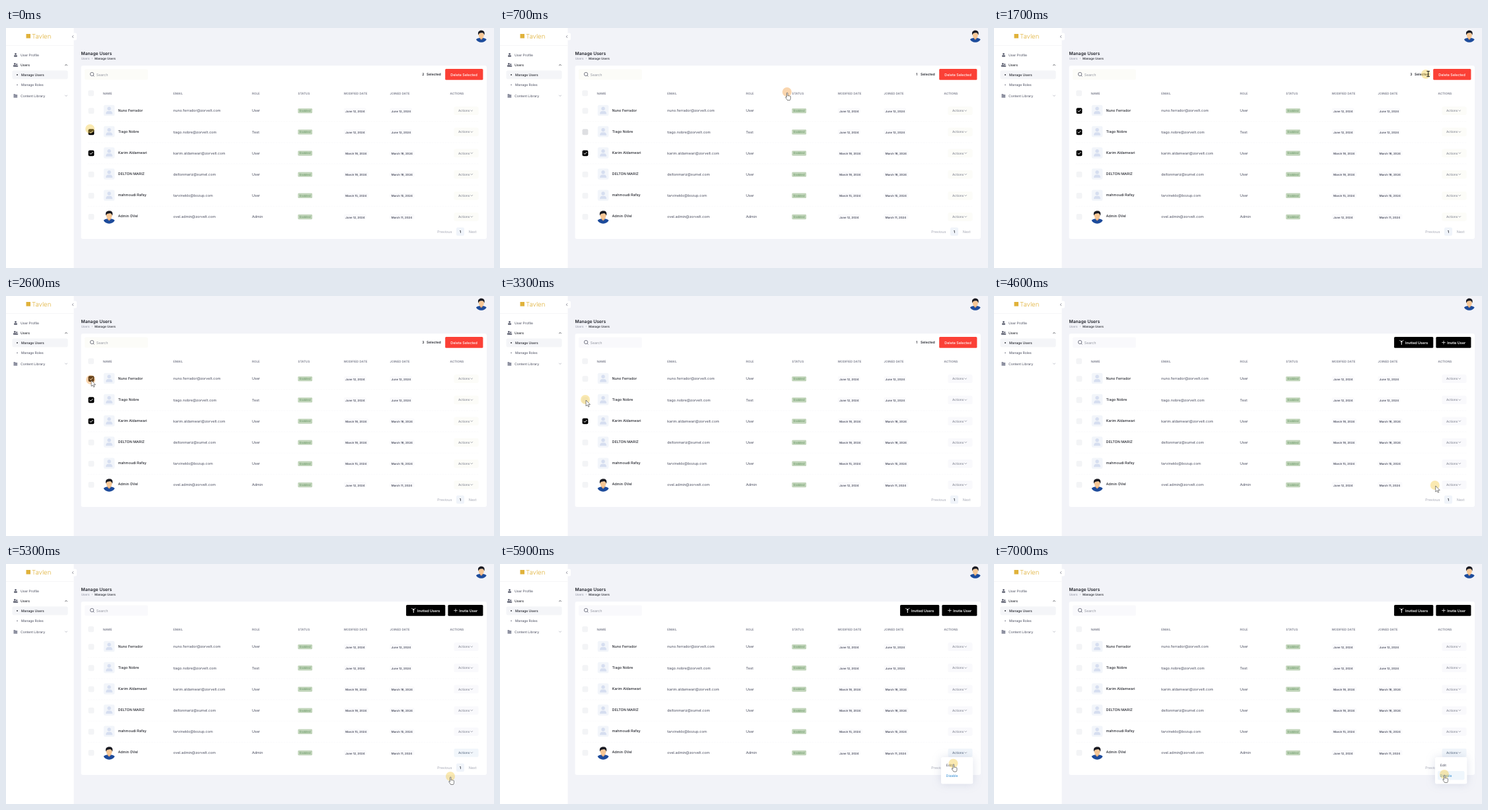
An HTML page for the animation above (7500 ms loop, 738x364 px).

```html
<!DOCTYPE html>
<html lang="en">
<head>
<meta charset="utf-8">
<title>Manage Users</title>
<style>
html, body { margin: 0; width: 100%; height: 100%; overflow: hidden; background: #f2f3f8; }
svg { display: block; width: 738px; height: 364px; font-family: Inter, sans-serif; }
text { white-space: pre; text-rendering: geometricPrecision; }
.line { fill: none; stroke-linecap: round; stroke-linejoin: round; }
</style>
</head>
<body>
<svg id="stage" viewBox="0 0 738 364"></svg>
<script>
const LOOP = 7500, STEP = 100;
const stage = document.getElementById('stage');

const rect = (x, y, w, h, fill, r = 0, more = '') =>
  `<rect x="${x}" y="${y}" width="${w}" height="${h}" rx="${r}" fill="${fill}" ${more}/>`;
const circle = (x, y, r, fill, more = '') => `<circle cx="${x}" cy="${y}" r="${r}" fill="${fill}" ${more}/>`;
const line = (d, color, width = 0.7, more = '') =>
  `<path class="line" d="${d}" stroke="${color}" stroke-width="${width}" ${more}/>`;
const shape = (d, fill, more = '') => `<path d="${d}" fill="${fill}" ${more}/>`;
const text = (x, y, str, size, fill, weight = 400, more = '') =>
  `<text x="${x}" y="${y}" font-size="${size}" fill="${fill}" font-weight="${weight}" ${more}>${str}</text>`;
const group = (id, body, more = '') => `<g id="${id}" ${more}>${body}</g>`;
const chevron = (x, y, color, up = 1) => line(`M${x - 1.5} ${y + up * .8}l1.5 ${-1.5 * up} 1.5 ${1.5 * up}`, color);

const DARK = '#22242c', GRAY = '#606373', PALE = '#a3a6b3';
const rowY = i => 125.5 + 32.17 * i;

const users = [
  ['Nuno Ferrador', 'nuno.ferrador@zorvelt.com', 'User', 'June 12, 2024', 'June 12, 2024'],
  ['Tiago Nobre', 'tiago.nobre@zorvelt.com', 'Test', 'June 12, 2024', 'June 12, 2024'],
  ['Karim Aldamwari', 'karim.aldamwari@zorvelt.com', 'User', 'March 18, 2024', 'March 18, 2024'],
  ['DELTON MARIZ', 'deltonmariz@xumel.com', 'User', 'March 18, 2024', 'March 18, 2024'],
  ['mahmoudi Rafsy', 'tarvineklo@bozup.com', 'User', 'March 15, 2024', 'March 15, 2024'],
  ['Admin OVel', 'ovel.admin@zorvelt.com', 'Admin', 'June 12, 2024', 'March 11, 2024']
];

function portrait(x, y, scale) {
  return `<g transform="translate(${x} ${y}) scale(${scale})">` +
    shape('M-8.5 5.5Q-6.5 3.4-2.5 3H2.5Q6.5 3.4 8.5 5.5Q6 10.3 0 10.3Q-6 10.3-8.5 5.5Z', '#1d4b9b') +
    shape('M-2.2 1H2.2V4L0 6.2-2.2 4Z', '#e3a978') +
    shape('M-4.2-5H4.2V-.5Q3.4 3.8 0 3.8Q-3.4 3.8-4.2-.5Z', '#f7c795') +
    shape('M-4.9-1.5Q-6-6.5-3.8-7.8Q-1-10 2.5-8.8Q6.2-7.5 4.9-1.5L3.9-3.8Q2.8-5.8 0-5.2Q-3-4.8-3.9-3.8Z', '#191a22') + '</g>';
}

function placeholder(x, y) {
  return rect(x - 8.3, y - 8.3, 16.6, 16.6, '#f2f5fa', 2.5) + circle(x, y - 2.7, 2.7, '#d6def0') +
    shape(`M${x - 5} ${y + 5.5}Q${x - 5} ${y + 1} ${x - 1.5} ${y + 1}h3Q${x + 5} ${y + 1} ${x + 5} ${y + 5.5}Z`, '#d6def0');
}

function sidebar() {
  const person = (x, y, s = 1) => circle(x, y - 1.6 * s, 1.4 * s, GRAY) + rect(x - 2.5 * s, y + .3 * s, 5 * s, 2.4 * s, GRAY, 1);
  return rect(0, 0, 102.5, 364, '#fff') + rect(0, 26, 102.5, .6, '#f0f0f3') +
    rect(30.5, 9, 6.5, 6.5, '#e0b23a') + text(39, 16.2, 'Tavlen', 9.6, '#e0b23a', 300) +
    rect(96, 7.5, 11, 11, '#fff', 2) + line('M101.8 11.5l-1.6 1.6 1.6 1.6', GRAY) +
    person(14.5, 41) + text(22, 42.8, 'User Profile', 5, GRAY, 500) +
    person(13.3, 56) + person(16.3, 56.5, .8) + text(22, 58, 'Users', 5, DARK, 500) + chevron(91, 56, DARK) +
    rect(9.5, 64.5, 84, 13, '#f4f5f8', 2) +
    circle(17, 71, .9, DARK) + text(23, 72.8, 'Manage Users', 5, DARK, 500) +
    circle(17, 86.3, .8, GRAY) + text(23, 88.1, 'Manage Roles', 5, GRAY, 500) +
    shape('M11.5 100h2.3l.8 1h2.6v4.8h-5.7z', '#8d90a0') +
    text(22, 104.6, 'Content Library', 5, GRAY, 500) + chevron(91, 102.8, PALE, -1);
}

function header() {
  return portrait(718.8, 12.2, .93) + text(113.5, 41, 'Manage Users', 6.7, DARK, 600) +
    text(113.7, 47.5, 'Users', 4.6, '#8a8d9c') + circle(130.3, 46, .6, PALE) +
    text(134, 47.5, 'Manage Users', 4.6, DARK, 500) +
    rect(113.5, 57, 613.5, 263, '#fff', 3);
}

function table() {
  const heads = { NAME: 146.5, EMAIL: 253, ROLE: 372, STATUS: 441.5, 'MODIFIED DATE': 511, 'JOINED DATE': 580.5, ACTIONS: 671.5 };
  let out = rect(119, 62.5, 95.5, 16, '#fafafc', 2, 'class="soft"') + circle(130, 70, 2.7, 'none', `stroke="${GRAY}" stroke-width=".8"`) +
    line('M132 72l1.2 1.3', GRAY) + text(136.5, 72.7, 'Search', 5.4, '#92959f') +
    rect(124.3, 94.6, 8.6, 8.6, '#f3f4f6', 2);
  for (const name in heads) out += text(heads[name], 100.8, name, 4.6, '#7c7f8e', 600);
  users.forEach(([name, email, role, modified, joined], i) => {
    const y = rowY(i), last = i === 5;
    if (i) out += line(`M124 ${y - 16}H715`, '#f7f7f9', .6, 'stroke-dasharray="2 2"');
    out += rect(124.5, y - 4.3, 8.8, 8.8, '#f3f4f6', 2, `id="box${i}"`) +
      line(`M126.9 ${y + .2}l1.5 1.5 2.7-3.2`, '#fff', 1, `id="tick${i}"`) +
      (last ? portrait(156, y, 1) : placeholder(156, y - .5)) +
      text(169.5, y + 1.1, name, 5.4, DARK, 500) + text(253, y + 1.9, email, 5.4, GRAY, 500) +
      text(372, y + 1.9, role, 5.4, GRAY, 500) +
      rect(441.5, y - 3.6, 21.7, 7.4, '#c0d4b9', 1.3) + text(444, y + 1.5, 'Enabled', 4.3, '#6b9a68', 500) +
      [[511, modified], [580.5, joined]].map(([x, date]) =>
        rect(x, y - 4, date[0] === 'M' ? 37 : 33.5, 8, '#fafafc', 1.5) + text(x + 2.3, y + 2.3, date, 4.3, '#4d5060', 600)).join('') +
      rect(677.5, y - 6.3, 37, 12.8, '#f9f9fb', 2, `class="soft" id="action${i}"`) +
      text(684, y + 1.7, 'Actions', 4.8, '#858895', 500, `id="label${i}"`) + chevron(704.2, y, '#858895', -1);
  });
  return out + text(652.3, 310.5, 'Previous', 5.4, PALE) + rect(681, 302.5, 12, 12.5, '#f0f4fa', 2) +
    text(687, 310.5, '1', 5.4, DARK, 600, 'text-anchor="middle"') + text(699.7, 310.5, 'Next', 5.4, PALE);
}

function toolbar() {
  const button = (x, w, fill) => rect(x, 61.9, w, 16.8, fill, 1.5);
  const selected = text(629.3, 72.4, '', 5.1, DARK, 600, 'id="count"') + text(636, 72.4, 'Selected', 5.1, DARK, 600) +
    button(664.2, 57.2, '#fb4036') + text(672.3, 72.5, 'Delete Selected', 5.4, '#fff', 500);
  const invite = button(605.1, 59.2, '#000') + button(668.4, 53, '#000') +
    circle(616.3, 69.3, 1.3, '#fff') + line('M614.3 67.8l-.6-.6M618.3 67.8l.6-.6M616.3 71v2.6', '#fff', 1) +
    text(622, 72.5, 'Invited Users', 5.4, '#fff', 600) +
    line('M680 68.2v4.6M677.7 70.5h4.6', '#fff') + text(685.2, 72.5, 'Invite User', 5.4, '#fff', 600);
  return group('selected', selected) + group('invite', invite);
}

function menu() {
  return group('menu', rect(667, 293, 48.3, 40.5, '#fff', 2.5, 'style="filter:drop-shadow(0 0 7px #596a9930)"') +
    text(674.8, 307, 'Edit', 5, GRAY, 500) + rect(671, 314, 40.5, 13.5, '#eff6fc', 2, 'id="hover"') +
    text(674.8, 322.7, 'Disable', 5, '#3b91d4', 500));
}

function pointer() {
  const edge = 'stroke="#333" stroke-width=".6" stroke-linejoin="round"';
  return group('pointer', circle(0, 0, 7, '#f4cb45', 'id="glow" opacity=".42"') +
    group('arrow', shape('M1 1V10L3.1 8.1 4.6 11.2 6 10.5 4.6 7.6H7.4Z', '#fff', edge)) +
    group('hand', shape('M0 1.2Q0 .2.8.2Q1.7.2 1.7 1.2V5Q2.6 4.3 3.3 5Q4.2 4.5 4.8 5.3Q6 5 6 6.3V8.6Q6 10 5 11.5H1Q.3 10-1.7 7.5Q-1.9 6.2-.8 6.5L0 7.2Z', '#fff', edge + ' transform="translate(-.5 1)"')) +
    group('beam', line('M1.7-4.4h4M3.7-4.4v8M1.7 3.6h4', '#222', 1)));
}

stage.innerHTML = sidebar() + header() + table() + toolbar() + menu() + pointer();
const el = id => document.getElementById(id);
const show = (id, on) => el(id).setAttribute('display', on ? 'inline' : 'none');
const paint = (id, color) => el(id).setAttribute('fill', color);

// Pointer stops: time, x, y, cursor used from then on.
const stops = [
  [0, 127, 153, 'none'], [100, 128, 154, 'arrow'], [700, 434, 97, 'hand'], [900, 456, 94, 'arrow'],
  [1300, 695, 71, 'hand'], [1700, 653, 70, 'beam'], [1800, 668, 71, 'arrow'], [2300, 104, 194, 'arrow'],
  [2600, 128, 127, 'arrow'], [3000, 129, 157, 'arrow'], [3300, 129, 157, 'arrow'], [4100, 573, 287, 'arrow'],
  [4800, 690, 287, 'hand'], [5300, 672, 322, 'hand'], [5700, 690, 287, 'hand'], [6100, 681, 318, 'hand'],
  [6600, 681, 319, 'hand'], [LOOP, 681, 319, 'hand']
];
// Spans of time in which each checkbox is ticked.
const ticked = [[[900, 2700]], [[0, 100], [800, 3300]], [[0, 4200]], [], [], []];
const clicks = [700, 2600, 3200, 5700];
const within = (t, spans) => spans.some(([from, to]) => t >= from && t < to);

function draw(t) {
  const checks = ticked.map(spans => within(t, spans));
  const count = checks.filter(Boolean).length;
  checks.forEach((on, i) => {
    const focused = i === 1 && t < 800;
    paint('box' + i, on ? '#000' : focused ? '#dedfe2' : '#f3f4f6');
    show('tick' + i, on);
  });
  el('count').textContent = count;
  show('selected', count > 0);
  show('invite', count === 0);

  document.querySelectorAll('.soft').forEach(node => node.setAttribute('fill', t < 2700 ? '#fcfcf8' : '#f9f9fc'));
  if (t >= 4800) paint('action5', '#f1f6fb');
  paint('label5', t >= 4800 ? '#5f6f86' : '#858895');
  show('menu', t >= 5700);
  show('hover', t >= 6000);

  const next = stops.findIndex(stop => stop[0] > t);
  const [t0, x0, y0, cursor] = stops[next - 1], [t1, x1, y1] = stops[next];
  const p = (t - t0) / (t1 - t0), ease = p * p * (3 - 2 * p);
  el('pointer').setAttribute('transform', `translate(${x0 + (x1 - x0) * ease} ${y0 + (y1 - y0) * ease})`);
  for (const kind of ['arrow', 'hand', 'beam']) show(kind, kind === cursor);
  paint('glow', clicks.includes(t) ? '#f09a3e' : '#f4cb45');
}

const start = performance.now();
function frame() {
  const t = (performance.now() - start) % LOOP;
  draw(Math.floor(t / STEP) * STEP);
  requestAnimationFrame(frame);
}
frame();
</script>
</body>
</html>
```
